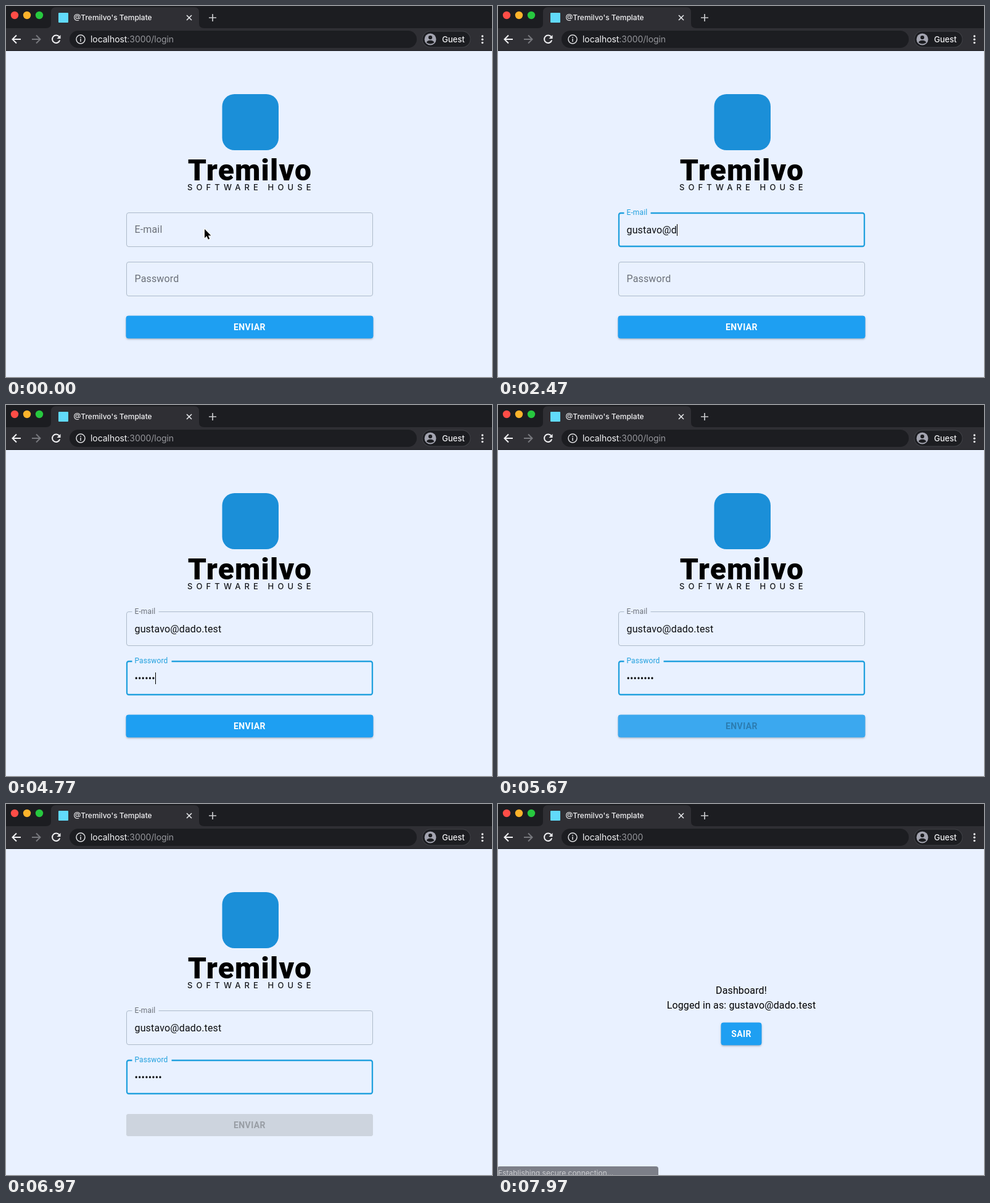
These frames come from a looping animation (788 by 602 pixels, 8 s). An HTML page with a canvas:

```html
<!DOCTYPE html>
<html lang="pt">
<head>
<meta charset="utf-8">
<title>Login</title>
<style>
  html, body { margin: 0; width: 100%; height: 100%; overflow: hidden; background: #e9f1ff; }
  canvas { display: block; }
</style>
</head>
<body>
<canvas id="stage" width="788" height="602"></canvas>
<script>
const ctx = document.getElementById('stage').getContext('2d');

const LOOP = 8000;
const BRAND = 'Tremilvo';
const EMAIL = 'gustavo@dado.test';
const UI = 'Inter, sans-serif';
const APP = 'Roboto, sans-serif';

const PAGE = [233, 241, 255];
const BLUE = [30, 159, 242];
const FOCUS = [32, 160, 222];
const GREY = [107, 112, 121];
const DISABLED = [205, 212, 222];
const STRIP = '#1c1d21';
const BAR = '#2f2f34';

// Timeline in ms
const EMAIL_FOCUS = 400;
const PASS_FOCUS = 3535;
const SUBMIT = 5617;
const DASHBOARD = 7150;
const BUBBLE = 7850;

const series = (start, step, n) => Array.from({ length: n }, (_, i) => start + i * step);
const emailKeys = [...series(1000, 130, 7), 2150, 2400, ...series(2530, 100, 8)];
const passKeys = series(4080, 130, 8);

const clamp = v => Math.min(1, Math.max(0, v));
const mix = (a, b, p) => a + (b - a) * p;
const rgb = c => `rgb(${c.map(Math.round).join(',')})`;
const blend = (a, b, p) => rgb(a.map((v, i) => mix(v, b[i], p)));

// CSS-style cubic-bezier, solved by bisection
function bezier(x1, y1, x2, y2) {
  const at = (a, b, u) => 3 * a * u * (1 - u) ** 2 + 3 * b * u * u * (1 - u) + u ** 3;
  return x => {
    if (x <= 0) return 0;
    if (x >= 1) return 1;
    let lo = 0, hi = 1;
    for (let i = 0; i < 24; i++) {
      const u = (lo + hi) / 2;
      if (at(x1, x2, u) < x) lo = u; else hi = u;
    }
    return at(y1, y2, lo);
  };
}
const easeOut = bezier(0, 0, .2, 1);
const easeInOut = bezier(.4, 0, .2, 1);

function text(str, x, y, font, color, { align = 'left', spacing = 0 } = {}) {
  ctx.font = font;
  ctx.fillStyle = color;
  ctx.textAlign = align;
  ctx.letterSpacing = spacing + 'px';
  ctx.fillText(str, x, y);
  return ctx.measureText(str).width;
}

function box(x, y, w, h, r, color) {
  ctx.beginPath();
  ctx.roundRect(x, y, w, h, r);
  ctx.fillStyle = color;
  ctx.fill();
}

function disc(x, y, r, color) {
  ctx.beginPath();
  ctx.arc(x, y, r, 0, Math.PI * 2);
  ctx.fillStyle = color;
  ctx.fill();
}

function stroke(path, color, width = 2) {
  ctx.strokeStyle = color;
  ctx.lineWidth = width;
  ctx.stroke(new Path2D(path));
}

function drawBrowser(path) {
  box(0, 0, 788, 37, 0, STRIP);
  box(0, 36, 788, 36, 0, BAR);
  box(0, 72, 788, 1, 0, '#18191d');
  ['#ff4d47', '#fdb32b', '#27c83f'].forEach((c, i) => disc(14 + i * 20, 15, 6.2, c));

  ctx.fillStyle = BAR;
  ctx.fill(new Path2D('M65 36q8 0 8-8V10q0-8 8-8H305q8 0 8 8V28q0 8 8 8Z'));
  box(85, 11, 16, 16, 1, '#61dafb');
  text(`@${BRAND}'s Template`, 109.5, 23, `500 12px ${UI}`, '#f1f1f3');
  stroke('M293 15l8 8M301 15l-8 8', '#e8eaed', 1.6);
  stroke('M329 19h12M335 13v12', '#c9cacd', 1.7);

  stroke('M24 54H11M17 47.5L10.5 54L17 60.5', '#f1f1f3');
  stroke('M42 54H55M49 47.5L55.5 54L49 60.5', '#77787d');
  stroke('M86.3 50.2A6.2 6.2 0 1 0 87.2 55.5', '#f1f1f3');
  ctx.fillStyle = '#f1f1f3';
  ctx.fill(new Path2D('M88.5 47V53H82.5Z'));

  box(103, 40, 563, 28, 14, STRIP);
  stroke('M114 54a7 7 0 1 0 14 0a7 7 0 1 0-14 0M121 53v5M121 50v1.7', '#dcdde0', 1.5);
  const url = { spacing: -.05 };
  const host = text('localhost', 137, 59, `14px ${UI}`, '#f5f5f7', url);
  text(path, 137 + host, 59, `14px ${UI}`, '#96979c', url);

  box(674.5, 40.5, 79, 27, 13.5, '#414247');
  box(675.5, 41.5, 77, 25, 12.5, STRIP);
  disc(688, 54, 9.5, '#a3a4b0');
  disc(688, 51, 3.1, STRIP);
  ctx.fill(new Path2D('M682 59.5c0-5 12-5 12 0q-6 4-12 0Z'));
  text('Guest', 707, 59, `500 13px ${UI}`, '#f1f1f3');
  [49, 54.3, 59.6].forEach(y => disc(772.5, y, 1.7, '#f1f1f3'));
}

function drawBrand() {
  box(350.5, 143, 91.5, 91, 20, '#1b8fd8');
  text(BRAND, 395.5, 283, `900 48px ${APP}`, '#000', { align: 'center', spacing: 1.2 });
  text('SOFTWARE HOUSE', 294, 299, `500 13px ${UI}`, '#15171a', { spacing: 6.1 });
}

// Caret stays on for 500 ms after the last event, then blinks
function caretOn(t, focus, keys) {
  const last = keys.filter(k => k <= t).pop() ?? focus;
  return (t - last) % 1000 < 500;
}

function drawField({ label, y, notch, focus, blur, value, keys, t }) {
  const focused = t >= focus && t < blur;
  const w = focused ? 2 : 1;
  ctx.beginPath();
  ctx.roundRect(195 + w / 2, y + w / 2, 400 - w, 56 - w, 4 - w / 2);
  ctx.strokeStyle = focused ? rgb(FOCUS) : '#adbac9';
  ctx.lineWidth = focused ? 2.3 : 1;
  ctx.stroke();
  if (t >= focus + 50) box(204.5, y - 1, notch - 204.5, 4, 0, rgb(PAGE));

  const shrink = easeOut(clamp((t - focus) / 200));
  const faded = easeOut(clamp((t - blur) / 200));
  ctx.save();
  ctx.translate(208.5, mix(y + 33, y + 4, shrink));
  ctx.scale(mix(1, .75, shrink), mix(1, .75, shrink));
  text(label, 0, 0, `16px ${APP}`, blend(GREY, FOCUS, shrink * (1 - faded)), { spacing: .15 });
  ctx.restore();

  const typed = value.slice(0, keys.filter(k => k <= t).length);
  const width = text(typed, 208.5, y + 34, `16px ${APP}`, '#0c0e11', { spacing: .15 });
  if (focused && caretOn(t, focus, keys)) {
    box(Math.round(208.5 + width), y + 19, 1, 19, 0, '#000');
  }
}

function drawButton(label, x, y, w, off) {
  const soft = .3 * (1 - off);
  for (const [dy, blur, alpha] of [[2, 2, .14], [1, 5, .12]]) {
    ctx.save();
    ctx.shadowColor = `rgba(0,0,0,${alpha * (1 - off)})`;
    ctx.shadowOffsetY = dy;
    ctx.shadowBlur = blur;
    box(x - soft, y - soft, w + soft * 2, 36 + soft * 2, 4, blend(BLUE, DISABLED, off));
    ctx.restore();
  }
  const color = off > 0 ? 'rgba(0,0,0,.26)' : '#fff';
  text(label, x + w / 2, y + 23, `700 14px ${APP}`, color, { align: 'center', spacing: .4 });
}

function drawPointer(x, y) {
  const arrow = new Path2D('M0 0V14.5L3.4 11.3L5.8 16.8L8.2 15.7L5.8 10.4H10.4Z');
  ctx.save();
  ctx.translate(x, y);
  ctx.lineJoin = 'round';
  ctx.strokeStyle = '#fff';
  ctx.lineWidth = 2;
  ctx.stroke(arrow);
  ctx.fillStyle = '#000';
  ctx.fill(arrow);
  ctx.restore();
}

function drawLogin(t) {
  drawBrand();
  drawField({
    label: 'E-mail', y: 335, notch: 247.5, focus: EMAIL_FOCUS, blur: PASS_FOCUS,
    value: EMAIL, keys: emailKeys, t
  });
  drawField({
    label: 'Password', y: 415, notch: 268.5, focus: PASS_FOCUS, blur: LOOP,
    value: '•'.repeat(8), keys: passKeys, t
  });
  drawButton('ENVIAR', 195, 503, 400, easeInOut(clamp((t - SUBMIT) / 250)));
  if (t < EMAIL_FOCUS) drawPointer(322, 362);
}

function drawDashboard(t) {
  const style = { align: 'center', spacing: .15 };
  text('Dashboard!', 394.5, 308, `16px ${APP}`, '#000', style);
  text(`Logged in as: ${EMAIL}`, 394.5, 332, `16px ${APP}`, '#000', style);
  drawButton('SAIR', 362, 355, 65, 0);

  ctx.globalAlpha = clamp((t - BUBBLE) / 200);
  box(-1, 588, 261, 24, 4, '#35363a');
  text('Establishing secure connection...', 0, 603, `12px ${UI}`, '#fff');
  ctx.globalAlpha = 1;
}

function frame(now) {
  const t = now % LOOP;
  const inside = t >= DASHBOARD;
  box(0, 0, 788, 602, 0, rgb(PAGE));
  drawBrowser(inside ? ':3000' : ':3000/login');
  if (inside) drawDashboard(t); else drawLogin(t);
  requestAnimationFrame(frame);
}
requestAnimationFrame(frame);
</script>
</body>
</html>
```
